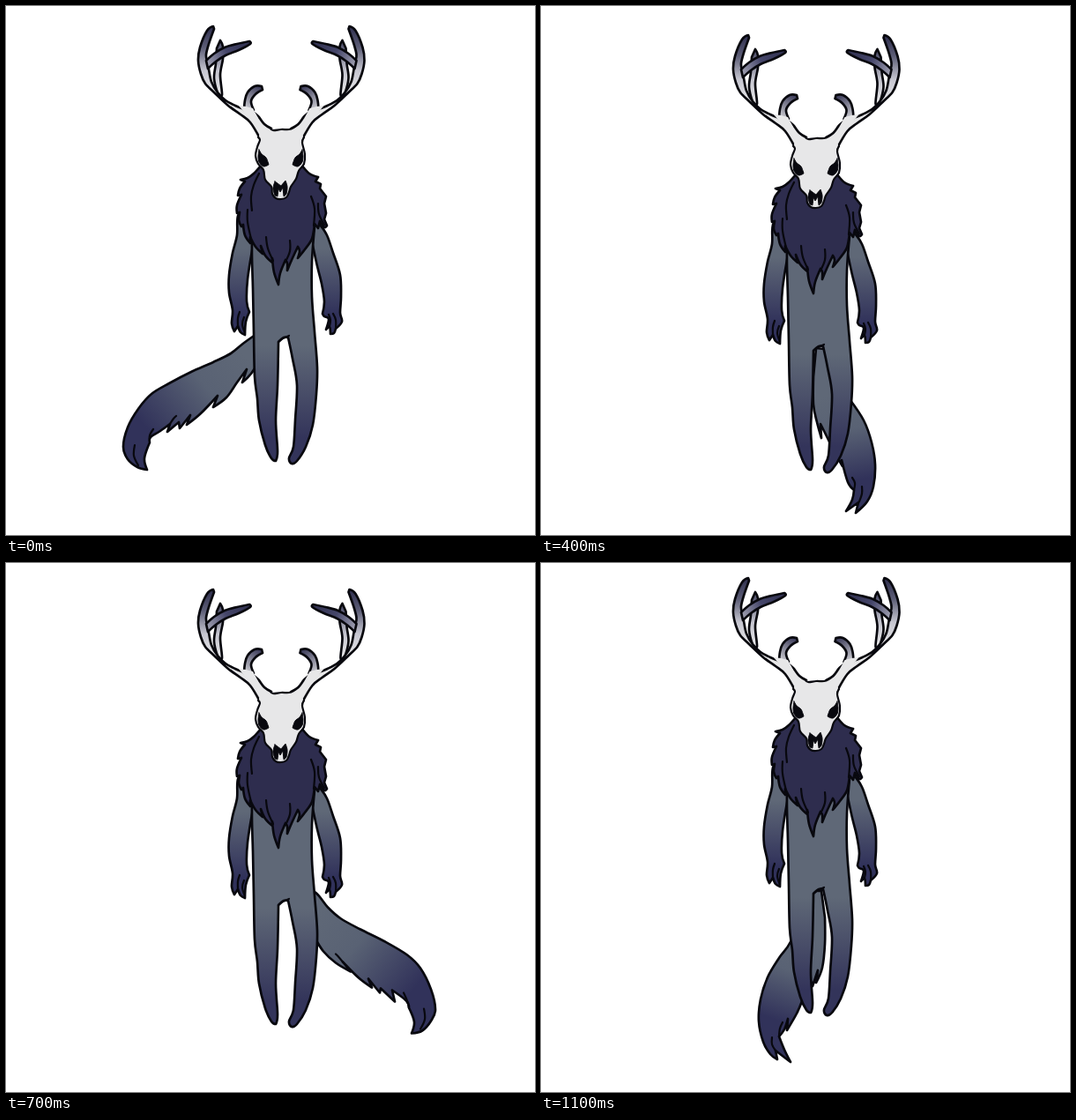
Animation, 600 px wide and 600 px high, one loop 1200 ms. Source, as an HTML page:

```html
<!DOCTYPE html>
<html lang="en">
<head>
<meta charset="utf-8">
<title>Floating stag spirit</title>
<style>
  html, body { margin: 0; width: 100%; height: 100%; overflow: hidden; background: #fff; }
  svg { display: block; width: 100%; height: 100%; }
  path { stroke: #08080e; stroke-width: 2.7; stroke-linejoin: round; stroke-linecap: round; }
  .line { fill: none; stroke-width: 2.2; }
  .black { fill: #08080e; stroke-width: 1; }
  .bare { stroke: none; }
</style>
</head>
<body>
<svg viewBox="0 0 600 600">
  <defs>
    <linearGradient id="legs" gradientUnits="userSpaceOnUse" x1="0" y1="385" x2="0" y2="490">
      <stop stop-color="#5f6877"/><stop offset="1" stop-color="#33345a"/>
    </linearGradient>
    <linearGradient id="arms" gradientUnits="userSpaceOnUse" x1="0" y1="275" x2="0" y2="350">
      <stop stop-color="#5f6877"/><stop offset="1" stop-color="#30315a"/>
    </linearGradient>
    <linearGradient id="beam" gradientUnits="userSpaceOnUse" x1="0" y1="24" x2="0" y2="100">
      <stop stop-color="#30304f"/><stop offset=".3" stop-color="#5c5d76"/>
      <stop offset=".65" stop-color="#c6c6d0"/><stop offset="1" stop-color="#e7e7e8"/>
    </linearGradient>
    <linearGradient id="prong" gradientUnits="userSpaceOnUse" x1="277" y1="42" x2="226" y2="68">
      <stop stop-color="#30304f"/><stop offset=".5" stop-color="#45466a"/><stop offset="1" stop-color="#a9a9b8"/>
    </linearGradient>
    <linearGradient id="hook" gradientUnits="userSpaceOnUse" x1="289" y1="92" x2="271" y2="122">
      <stop stop-color="#3a3a58"/><stop offset="1" stop-color="#e7e7e8"/>
    </linearGradient>
    <linearGradient id="fade" gradientUnits="userSpaceOnUse">
      <stop stop-color="#5f6877"/><stop offset=".35" stop-color="#596274"/><stop offset=".85" stop-color="#31325a"/>
    </linearGradient>
  </defs>

  <g id="figure">
    <path id="tail" fill="url(#fade)"/>
    <path id="hairs" class="line"/>

    <!-- arms -->
    <path fill="url(#arms)" data-p="272,225! 263,238 262,260 257,280 253,305 253,325 257,345 256,360 259,369! 263,363! 266,370 271,373! 272,358 276,347! 273,335 274,310 279,278! 285,240!"/>
    <path class="line" data-p="263,363! 263,354 265,347!"/>
    <path class="line" data-p="271,371! 268,361 270,353!"/>
    <path fill="url(#arms)" data-p="345,235! 356,248 364,260 371,280 379,305 380,330 379,348 381,358 374,366! 372,371 368,372! 367,364 363,367! 366,355 361,352 359,349! 361,335 358,315 353,295 348,272! 340,250!"/>
    <path class="line" data-p="374,366! 374,356 371,349!"/>
    <path class="line" data-p="367,363! 368,356 366,350!"/>

    <!-- torso and legs -->
    <path fill="url(#legs)" data-p="279,250! 279,285 280,320 281,370 282,420 285,445 287,470 294,498 301,513 306,516! 308,505 306,470 308,430 309,381! 315,376 320,376! 325,400 330,430 328,470 326,500 321,513 324,519 330,516 340,500 348,475 352,440 353,410 350,370 347,330 347,290 350,250!"/>
    <path class="line" stroke-width="3" data-p="309,381! 314,377 321,374!"/>

    <!-- fur collar -->
    <path fill="#2e2d4e" data-p="290,180! 281,190 274,195 266,197! 271,199! 265,207 263,215! 267,214! 262,226 262,235! 265,234! 264,243 267,250! 269,248! 271,260 277,269! 277,262! 283,273 291,281! 289,272! 294,283 302,291! 302,286! 304,302 309,316! 311,303 317,288! 319,292 319,300! 324,288 331,273! 333,278 331,286! 339,276 347,264 350,247! 354,252! 356,244! 361,251 364,249! 361,242! 363,235! 361,224! 363,216! 356,207! 357,202! 351,199! 354,194! 344,190 335,180!"/>
    <path class="line" data-p="287,190! 281,203 278,216 279,232!"/>
    <path class="line" data-p="274,231! 274,245 278,264!"/>
    <path class="line" data-p="295,262! 297,275 303,289!"/>
    <path class="line" data-p="322,266! 322,278 317,290!"/>
    <path class="line" data-p="346,216! 350,230 349,249!"/>
    <path class="line" data-p="354,224! 355,236 361,248!"/>

    <!-- antlers -->
    <g id="antler">
      <path fill="url(#beam)" data-p="243,39! 246,46 246,60 243,78 245,101 240,99! 236,82 238,65 239,48!"/>
      <path fill="url(#beam)" data-p="235,23! 228,28 220,47 218,62 221,77 226,88 237,99 252,113 266,123 277,132 288,150! 304,146! 301,139! 293,134 286,125 278,119 270,117 260,113 249,107 240,98 233,86 230,72 228,62! 227,55 230,43 236,26!"/>
      <path fill="url(#prong)" data-p="227,62! 236,54 248,47 262,43 276,40! 277,43 264,50 249,56 238,63 229,71!"/>
      <path fill="url(#hook)" data-p="270,118! 271,107 274,98 282,91 290,91! 291,95! 283,100 278,108 281,118!"/>
      <path class="bare" fill="#e7e7e8" data-p="264,113! 272,114! 280,116! 286,127! 276,128!"/>
    </g>
    <use href="#antler" transform="translate(624.5) scale(-1 1)"/>

    <!-- skull -->
    <path class="bare" fill="#e7e7e8" data-p="287,146! 300,139! 325,139! 337,147! 336,158! 288,158!"/>
    <path class="bare" fill="#e7e7e8" data-p="288,150! 285,160 283,170 286,179 292,186 294,197 301,205 302,213 306,218 312,219 318,217 321,211 323,205 329,196 332,187 338,179 339,168 336,155 337,150!"/>
    <path class="line" data-p="286,149! 288,152 285,160 283,170 286,179 292,186 294,197 301,205 302,213 306,218 312,219 318,217 321,211 323,205 329,196 332,187 338,179 339,168 336,155 338,149!"/>
    <path class="line" data-p="299,138! 303,141 312,140 321,140 326,138!"/>
    <path class="black" data-p="287,163! 290,168 295,172 298,180! 292,182 287,177 286,170!"/>
    <path class="black" data-p="336,163! 333,168 328,172 325,180! 331,182 336,177 337,170!"/>
    <path class="black" data-p="305,199! 303,207 305,215! 308,216! 309,207! 311,211! 314,206! 315,216! 318,213 319,205 317,198! 312,204!"/>
  </g>
</svg>
<script>
const $ = id => document.getElementById(id);

// Smooth curve through "x,y" points; a trailing "!" marks a corner.
function curve(text, closed) {
  const pts = text.trim().split(/\s+/).map(s => {
    const [x, y] = s.split(',').map(parseFloat);
    return { x, y, sharp: s.endsWith('!') };
  });
  const n = pts.length, at = i => pts[(i + n) % n];
  const handle = (i, side) => {
    const p = at(i), k = p.sharp ? 0 : side / 6;
    return `${p.x + k * (at(i + 1).x - at(i - 1).x)},${p.y + k * (at(i + 1).y - at(i - 1).y)}`;
  };
  let d = `M${pts[0].x},${pts[0].y}`;
  for (let i = 0; i < (closed ? n : n - 1); i++)
    d += `C${handle(i, 1)} ${handle(i + 1, -1)} ${at(i + 1).x},${at(i + 1).y}`;
  return d + (closed ? 'Z' : '');
}

for (const p of document.querySelectorAll('[data-p]'))
  p.setAttribute('d', curve(p.dataset.p, !p.classList.contains('line')));

// Tail poses: lift cancels the bob the pose was plotted at; fade runs root to tip.
const poses = [
  { lift: 0, fade: [270, 395, 145, 500],
    shape: '290,368! 270,382 255,394 235,404 210,415 185,428 165,440 150,457 138,478 133,500 138,514 149,523 160,526! 157,513 163,495! 164,489 175,482 186,474! 183,483! 196,472! 197,479! 209,464! 205,475! 221,462 240,442! 235,455! 250,444 262,427 273,412! 268,427! 278,417 290,398!',
    hairs: ['150,521! 145,510 146,498!', '163,494! 163,487 167,480!', '186,474! 190,468 193,465!'] },
  { lift: 5, fade: [310, 440, 220, 545],
    shape: '310,384! 290,420! 288,455 277,474 261,488! 269,486! 248,503! 256,502! 236,518! 246,516! 232,525 214,531! 219,537 200,537! 213,544! 195,552! 207,556 235,553 258,544 280,530 297,515 310,498 322,476 330,448! 326,384!',
    hairs: ['279,472! 274,480 266,486!', '219,537! 226,537 231,535!'] },
  { lift: 10, fade: [340, 440, 362, 555],
    shape: '312,388! 309,420! 309,452 313,472 318,490! 317,474! 323,486! 334,508 342,522! 341,515! 348,540 355,549! 353,560 346,573! 360,563! 357,575! 370,562 377,545 379,520 375,495 366,470 350,446! 330,390!',
    hairs: ['361,562! 364,553 364,545!', '355,549! 356,541 353,535!'] },
  { lift: 10.5, fade: [350, 405, 475, 510],
    shape: '335,368! 352,378 365,394 380,407 402,419 430,433 455,448 470,463 482,487 487,510 482,523 472,534 460,537! 463,524 457,508! 454,500 438,488! 441,501! 425,486! 424,491! 411,475! 415,485! 400,474 382,456! 391,467! 374,457 360,444 350,428! 340,410!',
    hairs: ['470,532! 475,521 474,509!', '457,508! 455,500 451,491!', '382,456! 377,450 374,447!'] },
  { lift: 0, fade: [312, 440, 400, 540],
    shape: '325,378! 335,420! 345,455 355,468 367,483! 361,482! 375,492 388,508! 380,507! 392,518 410,526! 406,533 420,533! 410,542! 425,549! 406,553 382,545 357,530 339,511 324,488 314,468 309,443! 309,380!',
    hairs: ['355,468! 357,475 362,482!', '406,534! 400,533 396,530!'] },
  { lift: -6, fade: [300, 425, 262, 535],
    shape: '309,372! 284,428 270,448 257,470 249,495 247,520 252,543 260,557 268,563! 266,553! 283,566! 276,552 270,537! 276,529 280,517! 279,530! 290,511 296,497! 300,490 308,476! 308,480! 314,462! 312,476! 319,459 322,432 322,402! 318,372!',
    hairs: ['266,553! 262,546 262,538!', '270,537! 271,528 274,521!'] }
].map(p => ({
  lift: p.lift,
  fade: p.fade,
  shape: curve(p.shape, true),
  hairs: p.hairs.map(h => curve(h)).join('')
}));

const bob = [0, 2.5, 5, 7.5, 10, 13.3, 10.5, 7, 3.5, -1, -3.3, -6];
let shown = -1;

function draw() {
  const step = Math.floor(performance.now() % 1200 / 100);
  if (step !== shown) {
    shown = step;
    const pose = poses[step >> 1];
    $('figure').setAttribute('transform', `translate(0 ${bob[step]})`);
    for (const id of ['tail', 'hairs'])
      $(id).setAttribute('transform', `translate(0 ${-pose.lift})`);
    $('tail').setAttribute('d', pose.shape);
    $('hairs').setAttribute('d', pose.hairs);
    ['x1', 'y1', 'x2', 'y2'].forEach((k, i) => $('fade').setAttribute(k, pose.fade[i]));
  }
  requestAnimationFrame(draw);
}
draw();
</script>
</body>
</html>
```
